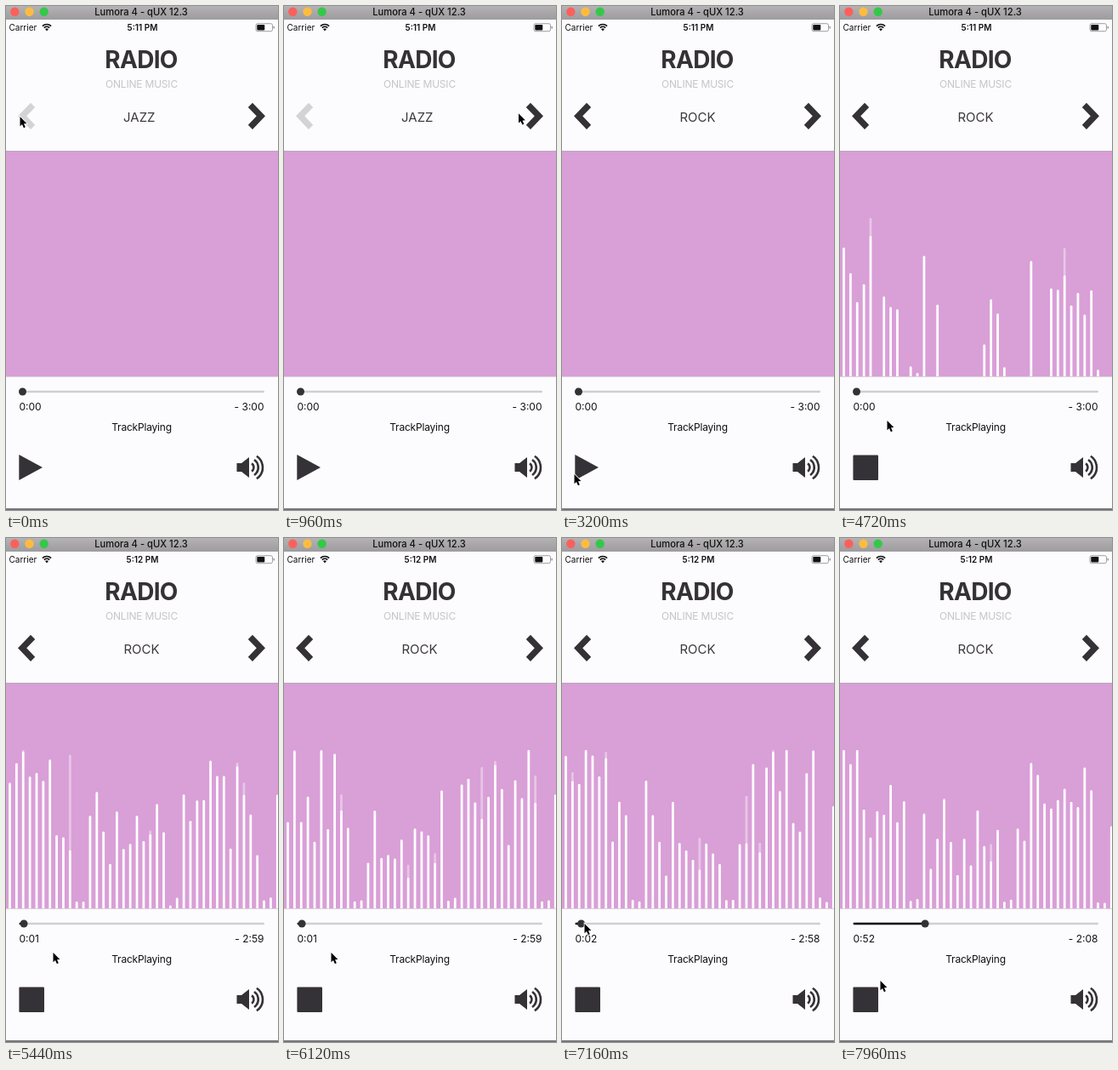
These frames come from a looping animation (320x592 px, 8 s). An HTML page with a canvas:

```html
<!DOCTYPE html>
<html lang="en">
<head>
<meta charset="utf-8">
<title>Radio player</title>
<style>
  html, body { margin: 0; width: 100%; height: 100%; overflow: hidden; background: #fcfbfd; }
  canvas { display: block; width: 320px; height: 592px; }
</style>
</head>
<body>
<canvas id="stage"></canvas>
<script>
const LOOP = 8000, WIDTH = 320, HEIGHT = 592;
const INK = '#343137', PAPER = '#fcfbfd', PINK = '#d99fd7';
const FLOOR = 435, BARS = 41, MUSIC_START = 4260, BEAT = 260;
const canvas = document.getElementById('stage');
const ctx = canvas.getContext('2d');
const ratio = window.devicePixelRatio || 1;
canvas.width = WIDTH * ratio;
canvas.height = HEIGHT * ratio;

const cursorMoves = [
  { start: 100, end: 1250, x: 293, y: 126 },
  { start: 2100, end: 2900, x: 14, y: 550 },
  { start: 4200, end: 4600, x: 55, y: 487 },
  { start: 6400, end: 6720, x: 26, y: 453 },
  { start: 7180, end: 7520, x: 102, y: 453 },
  { start: 7600, end: 7960, x: 47, y: 520 }
];

const ramp = (time, start, end) => Math.max(0, Math.min(1, (time - start) / (end - start)));
const easeOut = u => 1 - (1 - u) ** 2;
const smooth = u => u * u * (3 - 2 * u);

// Repeatable pseudo-random number from 0 to 1.
function random(a, b) {
  const n = Math.sin(a * 127.1 + b * 311.7 + 5.3) * 43758.5453;
  return n - Math.floor(n);
}

function fade(alpha, draw) {
  ctx.save();
  ctx.globalAlpha = alpha;
  draw();
  ctx.restore();
}

function rect(x, y, w, h, color, radius = 0) {
  ctx.fillStyle = color;
  ctx.beginPath();
  ctx.roundRect(x, y, w, h, radius);
  ctx.fill();
}

function disc(x, y, r, color) {
  ctx.fillStyle = color;
  ctx.beginPath();
  ctx.arc(x, y, r, 0, Math.PI * 2);
  ctx.fill();
}

function shape(points, color, outline) {
  ctx.beginPath();
  points.forEach(([x, y]) => ctx.lineTo(x, y));
  ctx.closePath();
  if (outline) {
    ctx.strokeStyle = outline;
    ctx.lineWidth = 1.6;
    ctx.stroke();
  }
  ctx.fillStyle = color;
  ctx.fill();
}

function arc(x, y, r, spread, width, middle, color) {
  ctx.strokeStyle = color;
  ctx.lineWidth = width;
  ctx.beginPath();
  ctx.arc(x, y, r, middle - spread, middle + spread);
  ctx.stroke();
}

function text(string, x, y, size, { color = '#111', weight = 400, align = 'center', spacing = 0 } = {}) {
  ctx.font = `${weight} ${size}px Inter, Roboto, sans-serif`;
  ctx.letterSpacing = spacing + 'px';
  ctx.textAlign = align;
  ctx.fillStyle = color;
  ctx.fillText(string, x, y);
}

function drawWindowBar() {
  const shade = ctx.createLinearGradient(0, 0, 0, 16);
  shade.addColorStop(0, '#b4b2b4');
  shade.addColorStop(1, '#9d9b9d');
  rect(0, 0, WIDTH, 16, shade);
  ['#fc605b', '#fdbc40', '#34c84a'].forEach((color, i) => disc(10.3 + 17.2 * i, 6.7, 5.2, color));
  text('Lumora 4 - qUX 12.3', 159, 11, 11.2, { weight: 500 });
}

function drawStatusBar(time) {
  text('Carrier', 3.5, 29, 10, { align: 'left' });
  const up = -Math.PI / 2;
  arc(48, 29, 7.5, 0.75, 1.7, up, '#111');
  arc(48, 29, 4.7, 0.75, 1.6, up, '#111');
  shape([[48, 29.5], [46, 27], [48, 26.3], [50, 27]], '#111');
  text(time < 5300 ? '5:11 PM' : '5:12 PM', 160.5, 29, 10, { weight: 600 });
  ctx.strokeStyle = '#888';
  ctx.lineWidth = 0.8;
  ctx.beginPath();
  ctx.roundRect(294, 20.7, 19.5, 9, 2);
  ctx.stroke();
  rect(295.3, 22, 9, 6.4, '#111', 0.8);
  rect(314.6, 23.7, 1.2, 3, '#888', 0.6);
}

function chevron(tip, direction) {
  const y = 129.3;
  const points = [[0, 0], [15, -15.6], [20.2, -10.4], [10.2, 0], [20.2, 10.4], [15, 15.6]];
  shape(points.map(([dx, dy]) => [tip + dx * direction, y + dy]), INK);
}

function drawHeader(time) {
  text('RADIO', 159, 73, 28, { color: INK, weight: 700, spacing: -0.7 });
  text('ONLINE MUSIC', 159.5, 95.5, 12, { color: '#c5c4c7', spacing: -0.2 });
  const push = ramp(time, 1640, 1860) - ramp(time, 1860, 2400);
  fade(0.2 + 0.8 * ramp(time, 1900, 2040), () => chevron(14, 1));
  fade(1 - 0.6 * push, () => chevron(305 + 10 * push, -1));
  const leave = ramp(time, 1680, 1940), enter = ramp(time, 1940, 2300);
  const genre = { color: '#3c393f' };
  fade(1 - leave, () => text('JAZZ', 156.8 - 60 * leave, 136, 15, genre));
  fade(enter, () => text('ROCK', 227 - 67.5 * enter, 136, 15, genre));
}

// Loudness wanders between random levels; some falling bars leave a faint peak behind.
function barAt(i, time) {
  const swell = Math.cos((i - 3) * Math.PI / 15);
  const quiet = (i + 4) % 14 < 2;
  const loudness = quiet ? 9 : 112 + 30 * swell;
  const level = step => Math.min(186, loudness * (0.35 + 1.15 * random(i, step)));
  const beat = time / BEAT + random(i, 0.5);
  const step = Math.floor(beat);
  const from = level(step), to = level(step + 1);
  const height = from + (to - from) * smooth(beat - step);
  const holdsPeak = !quiet && random(step, i) > 0.6;
  const early = random(i, 7) < 0.5 + 0.4 * swell;
  const wake = MUSIC_START + (early ? 0 : 500 + 400 * random(i, 9));
  const rise = ramp(time, wake, wake + 250);
  return { height: height * rise, peak: holdsPeak ? Math.max(0, from - height) * rise : 0 };
}

function drawSpectrum(time) {
  rect(0, 170, WIDTH, FLOOR - 169.5, '#b9a9ba');
  rect(0, 171, WIDTH, FLOOR - 171, PINK);
  for (let i = 0; i < BARS; i++) {
    const { height, peak } = barAt(i, time);
    const x = 3.1 + 7.87 * i;
    if (peak > 0.5) rect(x, FLOOR - height - peak, 2.8, peak, '#ffffff66', [1.4, 1.4, 0, 0]);
    if (height > 0.5) rect(x, FLOOR - height, 2.8, height, '#fff', [1.4, 1.4, 0, 0]);
  }
}

function clock(seconds) {
  return Math.floor(seconds / 60) + ':' + String(seconds % 60).padStart(2, '0');
}

function drawProgress(time) {
  const played = Math.max(0, Math.min(2, Math.floor((time - 4400) / 1000)));
  const seconds = played + 50 * easeOut(ramp(time, 7180, 7520));
  const knob = 19.5 + seconds / 180 * 279;
  rect(15.5, 451.7, 288.5, 2.6, '#cfced1', 1.3);
  if (seconds > 0) rect(15.5, 451.7, knob - 15.5, 2.6, '#111', 1.3);
  disc(knob, 453, 4.5, INK);
  const shown = Math.floor(seconds);
  text(clock(shown), 15.5, 474.5, 12, { align: 'left' });
  text('- ' + clock(180 - shown), 303.5, 474.5, 12, { align: 'right' });
  text('TrackPlaying', 159.5, 499, 12, { spacing: -0.2 });
}

function drawControls(time) {
  if (time < 4200) {
    fade(1 - 0.6 * ramp(time, 4040, 4120), () => shape([[15.3, 527], [43, 542], [15.3, 557]], INK));
  } else {
    rect(15.4, 527.4, 29.6, 29.6, INK, 1);
  }
  shape([[271.5, 537], [277, 537], [286, 530], [286, 554], [277, 547], [271.5, 547]], INK);
  [5.5, 10.8, 16].forEach(r => arc(286, 542, r, 0.98, 2.6, 0, INK));
  rect(0, 590, WIDTH, 2, '#77757a');
}

function drawCursor(time) {
  let x = 16, y = 130;
  for (const move of cursorMoves) {
    const u = easeOut(ramp(time, move.start, move.end));
    x += (move.x - x) * u;
    y += (move.y - y) * u;
  }
  const arrow = [[0, 0], [0, 11.2], [2.5, 8.9], [4.4, 13.2], [6.3, 12.3], [4.5, 8.2], [7.9, 8]];
  shape(arrow.map(([dx, dy]) => [x + 0.5 + dx, y + dy]), '#000', '#fff');
}

function render(now) {
  const time = now % LOOP;
  ctx.setTransform(ratio, 0, 0, ratio, 0, 0);
  rect(0, 0, WIDTH, HEIGHT, PAPER);
  drawWindowBar();
  drawStatusBar(time);
  drawHeader(time);
  drawSpectrum(time);
  drawProgress(time);
  drawControls(time);
  drawCursor(time);
}

const start = performance.now();
function frame() {
  render(performance.now() - start);
  requestAnimationFrame(frame);
}
frame();
</script>
</body>
</html>
```
